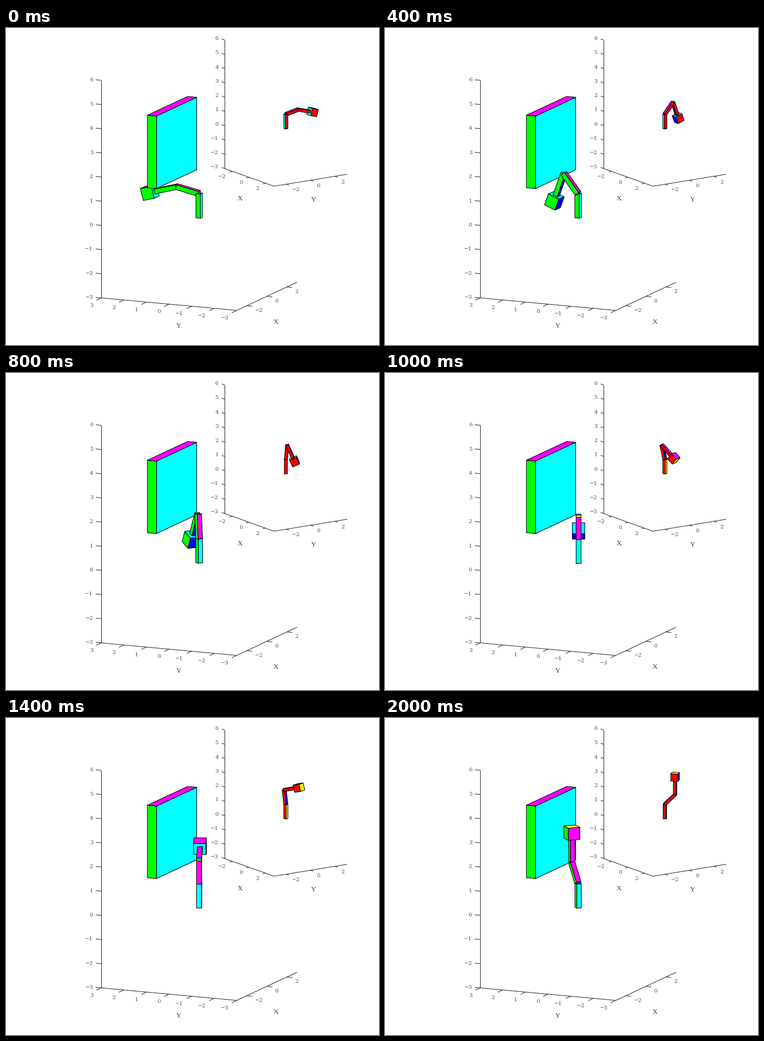
These frames come from a looping animation (686x583 px, 2100 ms). A matplotlib script:

```python
import numpy as np
import matplotlib.pyplot as plt
from matplotlib.animation import FuncAnimation
from matplotlib.collections import LineCollection, PolyCollection

W, H, DPI = 686, 583, 100
PX = 72 / DPI
FRAMES, STEP = 21, 100

# Joint angles in degrees: yaw, upper-arm elevation, forearm elevation
KEY_T = np.array([0, 4, 6, 10, 14, 16, 20.0])
KEY_POSE = np.array([
    [90, 11, -15.5], [88, 50, -70], [84, 63, -80], [24, 104, -40],
    [22, 98, 15], [34.5, 70, 56.5], [45, 45, 90]])
KEY_RATE = np.gradient(KEY_POSE, KEY_T, axis=0, edge_order=2)

# (local axis, side) -> colour
FACES = {(0, 1): "#ffff00", (0, 0): "#00ffff", (1, 1): "#00ff00",
         (1, 0): "#ff0000", (2, 1): "#ff00ff", (2, 0): "#0000ff"}


class View:
    """Orthographic camera with azimuth, elevation and pixel scale."""

    def __init__(self, az, el, scale, origin):
        az, el = np.radians([az, el])
        right = np.array([np.cos(az), np.sin(az), 0])
        self.toward = np.array([np.sin(az) * np.cos(el),
                                -np.cos(az) * np.cos(el), np.sin(el)])
        up = np.cross(self.toward, right)
        self.matrix = scale * np.column_stack([right, -up])
        self.origin = np.array(origin)

    def project(self, pts):
        return np.asarray(pts) @ self.matrix + self.origin


class Box:
    def __init__(self, base, yaw, pitch, lo, hi):
        a, p = np.radians([yaw, pitch])
        ca, sa, cp, sp = np.cos(a), np.sin(a), np.cos(p), np.sin(p)
        self.rot = np.array([[ca * cp, sa * cp, sp],
                             [-sa, ca, 0],
                             [-ca * sp, -sa * sp, cp]])
        self.base = np.asarray(base, float)
        self.ends = np.array([lo, hi], float)
        self.center = self.at(self.ends.mean(axis=0))

    def at(self, local):
        return self.base + np.asarray(local) @ self.rot

    def visible_faces(self, view):
        for (axis, side), color in FACES.items():
            if (2 * side - 1) * self.rot[axis] @ view.toward < 1e-3:
                continue
            j, k = [i for i in range(3) if i != axis]
            quad = np.empty((4, 3))
            quad[:, axis] = self.ends[side, axis]
            quad[:, j] = self.ends[[0, 1, 1, 0], j]
            quad[:, k] = self.ends[[0, 0, 1, 1], k]
            yield view.project(self.at(quad)), color


def pose(t):
    i = min(np.searchsorted(KEY_T, t, side="right") - 1, len(KEY_T) - 2)
    h = KEY_T[i + 1] - KEY_T[i]
    u = (t - KEY_T[i]) / h
    return ((1 + 2 * u) * (1 - u) ** 2 * KEY_POSE[i]
            + u * (1 - u) ** 2 * h * KEY_RATE[i]
            + u * u * (3 - 2 * u) * KEY_POSE[i + 1]
            + u * u * (u - 1) * h * KEY_RATE[i + 1])


def arm(t):
    yaw, upper, fore = pose(t)
    r = 0.1
    column = Box((0, 0, 0), yaw, 0, (-r, -r, 0), (r, r, 1))
    link = Box((0, 0, 1), yaw, upper, (0, -r, -r), (1, r, r))
    elbow = link.at((1, 0, 0))
    forearm = Box(elbow, yaw, fore, (0, -r, -r), (1, r, r))
    hand = Box(elbow, yaw, fore, (1, -.25, -.25), (1.5, .25, .25))
    return [column, link, forearm, hand]


WALL = Box((0, 0, 0), 90, 0, (1, -2, 1.5), (1.4, 2, 4.5))


def paint(coll, view, boxes, wall=None):
    """Fill the collection back to front."""
    order = sorted(boxes, key=lambda b: b.center @ view.toward)
    if wall:
        behind = [b for b in order if b.center[1] > 1.2]
        order = behind + [wall] + [b for b in order if b not in behind]
    faces = [f for b in order for f in b.visible_faces(view)]
    coll.set_verts([q for q, _ in faces])
    coll.set_facecolor([c for _, c in faces])


fig = plt.figure(figsize=(W / DPI, H / DPI), dpi=DPI, facecolor="white")
ax = fig.add_axes([0, 0, 1, 1])
ax.set(xlim=(0, W), ylim=(H, 0))
ax.axis("off")


def ruler(view, axis, corner, values, tick, shift, ha):
    """Axis line through a corner of the cube, with ticks and labels."""
    def point(v):
        p = np.array(corner, float)
        p[axis] = v
        return view.project(p)

    lines = [[point(-3), point(6 if axis == 2 else 3)]]
    for v in values:
        p = point(v)
        lines.append([p, p + tick])
        ax.text(*(p + shift), str(v).replace("-", "\u2212"), ha=ha,
                va="center", family="DejaVu Serif", size=10 * PX,
                color="#505050")
    ax.add_collection(LineCollection(lines, colors="#202020",
                                     linewidths=PX))


def name(x, y, s):
    ax.text(x, y, s, ha="center", va="center", family="Liberation Serif",
            size=13 * PX, color="#404040")


big = View(-66, 12, 45.45, (355.2, 348.6))
small = View(56, 14, 27.07, (514.7, 184.9))

ruler(big, 2, (-3, 3, -3), range(-3, 7), (-10, -1), (-15, -0.5), "right")
ruler(big, 1, (-3, -3, -3), range(-3, 4), (-9, 4.3), (-15, 14), "right")
ruler(big, 0, (-3, -3, -3), (-2, 0, 2), (10, 1), (15, 8.5), "left")
name(318, 548, "Y")
name(496, 541, "X")

ruler(small, 2, (-3, -3, -3), range(-3, 7), (-5.2, -1.9), (-11, -2.5), "right")
ruler(small, 0, (-3, -3, -3), (-2, 0, 2), (-5.4, 0.9), (-12, 9.5), "right")
ruler(small, 1, (3, -3, -3), (-2, 0, 2), (5.2, 1.9), (11, 10.5), "left")
name(430, 314, "X")
name(566, 316, "Y")

scenes = []
for cam, wall in ((big, WALL), (small, None)):
    coll = PolyCollection([], edgecolors="black", linewidths=1.1 * PX,
                          joinstyle="round", zorder=3)
    ax.add_collection(coll)
    scenes.append((coll, cam, wall))


def draw(i):
    boxes = arm(i)
    for coll, cam, wall in scenes:
        paint(coll, cam, boxes, wall)
    return [s[0] for s in scenes]


anim = FuncAnimation(fig, draw, frames=FRAMES, interval=STEP,
                     repeat=True, repeat_delay=0, blit=False)
plt.show()
```
